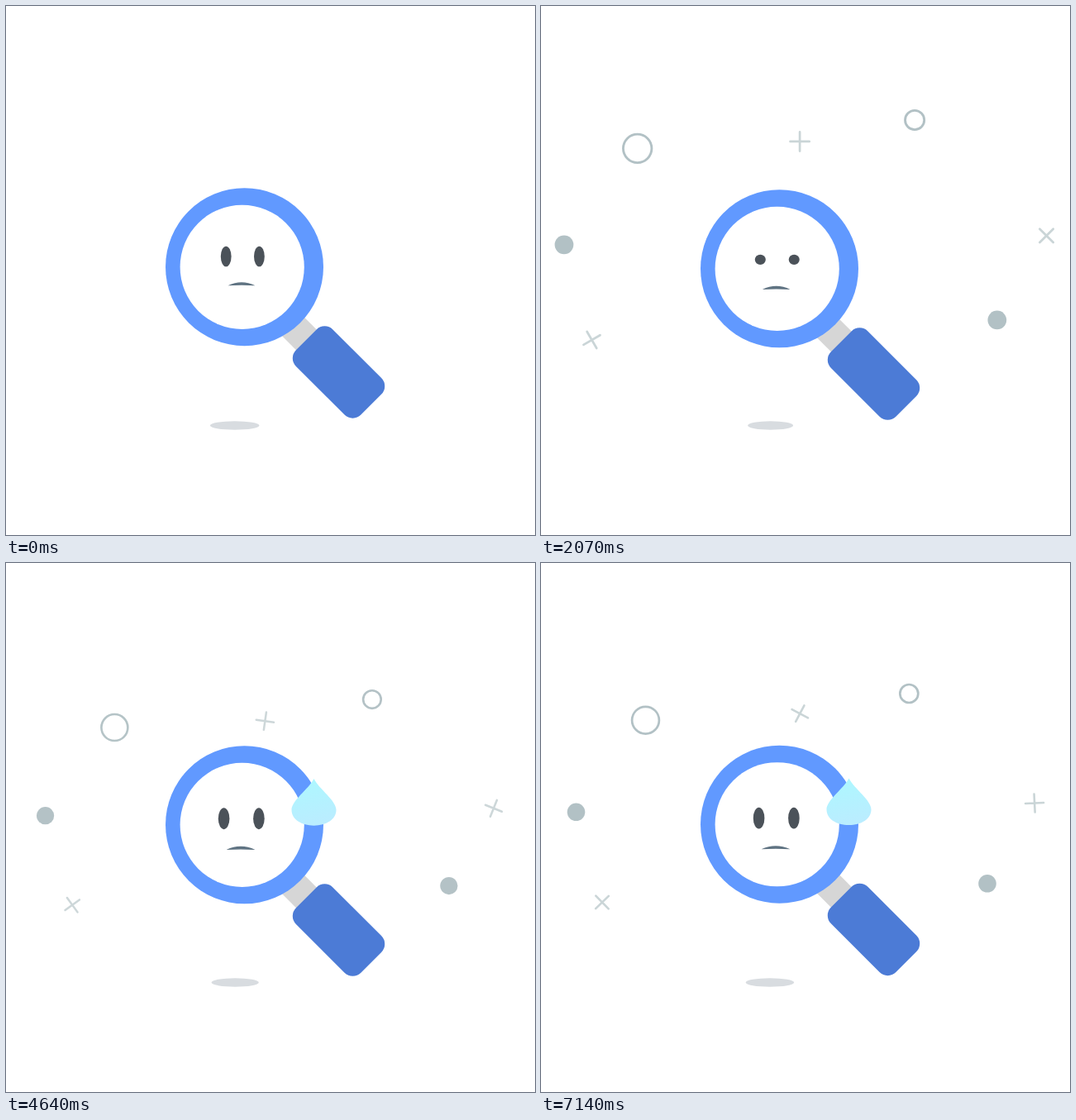
Recreate the animation shown at these times as an HTML page. Size 640 by 640 pixels, loop 7.21 s.

```html
<!DOCTYPE html>
<html lang="en">
<head>
<meta charset="utf-8">
<title>Nothing found</title>
<style>
  html, body { margin: 0; width: 100%; height: 100%; overflow: hidden; background: #fff; }
  svg { display: block; width: 100vw; height: 100vh; }
</style>
</head>
<body>
<svg viewBox="0 0 640 640">
  <defs>
    <linearGradient id="water" x1="0" y1="0" x2="0.2" y2="1">
      <stop offset="0" stop-color="#acf8ff"/>
      <stop offset="1" stop-color="#baedff"/>
    </linearGradient>
  </defs>
  <ellipse id="shadow" cy="507.5" ry="5.2" fill="#d8dce0"/>
  <g id="particles"></g>
  <g id="glass">
    <g transform="translate(402.5 443) rotate(45)">
      <rect x="-92" y="-17.5" width="60" height="35" fill="#d6d6d6"/>
      <rect x="-55.5" y="-31.5" width="111" height="63" rx="14" fill="#4c7bd6"/>
    </g>
    <circle cx="288.5" cy="315.7" r="95.5" fill="#6199ff"/>
    <circle cx="285.7" cy="315.8" r="75.1" fill="#fff"/>
    <ellipse id="eyeL" fill="#4b5259"/>
    <ellipse id="eyeR" fill="#4b5259"/>
    <path id="mouth" d="M-16.5 2.3Q0 -6 16.5 2.3Q0 1.3 -16.5 2.3Z" fill="#5f7382"/>
    <path id="drop" d="M0 -28.3C7 -15 27 -2 27 9.5C27 21 15 28.3 0 28.3C-15 28.3 -27 21 -27 9.5C-27 -2 -7 -15 0 -28.3Z" fill="url(#water)"/>
  </g>
</svg>
<script>
const LOOP = 7210, STEP = LOOP / 101;
const ORIGIN = { x: 317, y: 536 };
const $ = id => document.getElementById(id);

const linear = p => p;
const smooth = p => (1 - Math.cos(Math.PI * p)) / 2;

// Value at time t of a table of [time, value] steps.
function track(steps, t, ease = linear) {
  if (t <= steps[0][0]) return steps[0][1];
  for (let i = 1; i < steps.length; i++) {
    const [t0, v0] = steps[i - 1], [t1, v1] = steps[i];
    if (t < t1) return v0 + (v1 - v0) * ease((t - t0) / (t1 - t0));
  }
  return steps[steps.length - 1][1];
}

const EARLY = [[0, 0], [1685, 1.103], [2070, 1.053], [2380, 1.012], [2900, .948], [3300, .95], [5430, 1]];
const LATE = [[225, 0], [1620, 1.104], [2950, .9], [5500, 1]];
const BLINK = [[1960, 1], [2150, .12], [2380, 1]];
const FACE = [[1900, 0], [2400, 1]];
const DROP = [[2700, 0], [3540, 1]];

const TURN_LEFT = [[0, -97.7], [LOOP, 138]];
const TURN_TOP = [[0, -67], [2070, 0], [3430, 45], [LOOP, 211]];
const TURN_RIGHT = [[0, -9], [LOOP, 179]];

const ring = r => `<circle r="${r}" fill="none" stroke="#b2c1c5" stroke-width="2.7"/>`;
const dot = '<circle r="10.8" fill="#b2c1c5"/>';
const cross = '<path d="M-11 0H11M0 -11V11" fill="none" stroke="#cad5d7" stroke-width="2.6" stroke-linecap="round"/>';

const particles = [
  { x: 126.5, y: 190.2, shape: ring(16.4) },
  { x: 445.3, y: 158, shape: ring(11), early: true },
  { x: 42.5, y: 301.3, shape: dot, early: true },
  { x: 540, y: 387.8, shape: dot, early: true },
  { x: 74, y: 410.5, shape: cross, turn: TURN_LEFT },
  { x: 313.3, y: 182.2, shape: cross, turn: TURN_TOP },
  { x: 597.1, y: 290.5, shape: cross, turn: TURN_RIGHT }
];
for (const p of particles) {
  p.node = document.createElementNS('http://www.w3.org/2000/svg', 'g');
  p.node.innerHTML = p.shape;
  $('particles').append(p.node);
}

function set(node, attrs) {
  for (const name in attrs) node.setAttribute(name, attrs[name]);
}

function draw(t) {
  const phase = t / LOOP * 3 % 1;
  const sink = 1 - Math.abs(1 - 2 * phase);
  set($('glass'), { transform: `translate(0 ${7.5 * sink})` });
  set($('shadow'), { cx: 276.7 + 3.4 * sink, rx: 29.8 - 8.3 * sink });

  const early = track(EARLY, t), late = track(LATE, t, smooth);
  for (const p of particles) {
    const s = p.early ? early : late;
    const x = ORIGIN.x + (p.x - ORIGIN.x) * s;
    const y = ORIGIN.y + (p.y - ORIGIN.y) * s;
    const angle = p.turn ? track(p.turn, t) : 0;
    set(p.node, {
      transform: `translate(${x} ${y}) rotate(${angle}) scale(${s})`,
      opacity: Math.min(1, p.early ? s : s * s)
    });
  }

  const face = track(FACE, t), open = track(BLINK, t);
  const eye = { cy: 303 + 5.2 * face, rx: 6.4 + .4 * face, ry: (12.3 + .6 * face) * open };
  set($('eyeL'), { cx: 266.2 - 2.6 * face, ...eye });
  set($('eyeR'), { cx: 306.4 - .5 * face, ...eye });
  set($('mouth'), { transform: `translate(${285 - face} ${336 + 7.6 * face}) scale(${1 + .06 * face} 1)` });

  const grow = track(DROP, t);
  set($('drop'), {
    transform: `translate(372.5 ${265.3 + 23 * grow}) scale(${.45 + .55 * grow})`,
    opacity: grow
  });
}

const start = performance.now();
function tick(now) {
  const t = Math.max(0, now - start) % LOOP;
  draw(Math.floor((t + 3) / STEP) * STEP % LOOP);
  requestAnimationFrame(tick);
}
draw(0);
requestAnimationFrame(tick);
</script>
</body>
</html>
```
